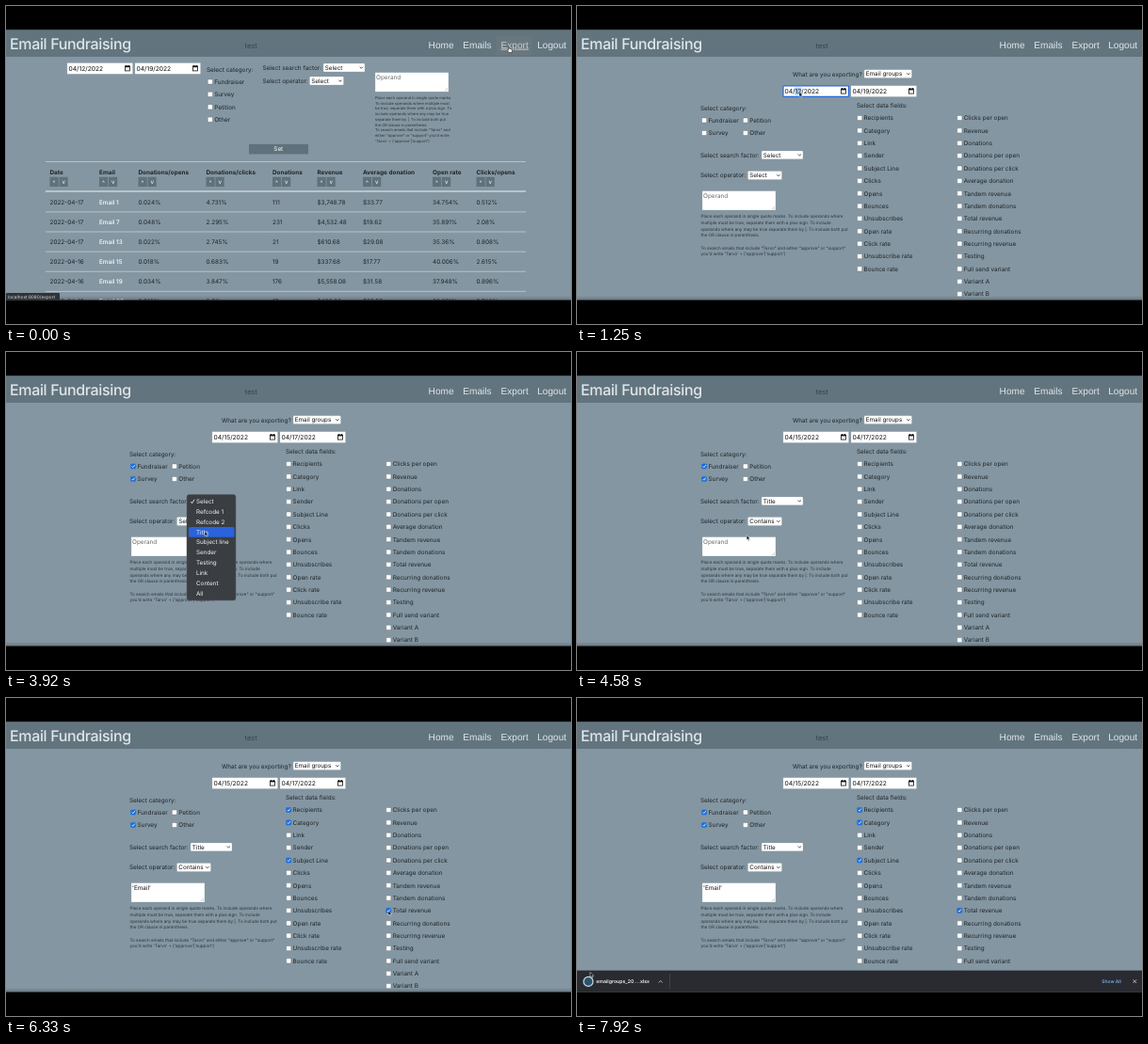
An HTML page for the animation above (8 s loop, 600 by 338 pixels).

```html
<!DOCTYPE html>
<html lang="en">
<head>
<meta charset="utf-8">
<title>Email Fundraising export</title>
<style>
html, body { margin: 0; width: 100%; height: 100%; overflow: hidden; background: #000; }
svg { display: block; width: 100vw; height: 100vh; }
text { font-family: Inter, "Open Sans", sans-serif; text-rendering: geometricPrecision; white-space: pre; }
.nav { font-family: "Liberation Sans", Arial, sans-serif; }
.brand { font-weight: 500; letter-spacing: -.35px; }
.medium { font-weight: 500; }
.semi { font-weight: 600; }
.bold { font-weight: 700; }
.under { text-decoration: underline; }
</style>
</head>
<body>
<svg id="stage" viewBox="0 0 600 338"></svg>
<script>
const INK = '#1d252a', PAGE = '#8496a1', BAR = '#62757f', PALE = '#e0e5e8';
const LOOP = 8000, FPS = 12;

// ---- drawing helpers; y is the middle of a line of text ----
const rect = (x, y, w, h, fill, extra = '') =>
  `<rect x="${x}" y="${y}" width="${w}" height="${h}" fill="${fill}" ${extra}/>`;
const text = (x, y, s, size = 6.4, fill = INK, extra = '') =>
  `<text x="${x}" y="${y + size * .36}" font-size="${size}" fill="${fill}" ${extra}>${s}</text>`;
const line = (d, color, w = .8) =>
  `<path d="${d}" fill="none" stroke="${color}" stroke-width="${w}"/>`;
const lines = (x, y, step, list, size) =>
  list.map((s, i) => text(x, y + i * step, s, size, '#29333a')).join('');

function check(x, y, label, on) {
  const box = rect(x + .3, y - 2.6, 5.2, 5.2, on ? '#1a6fe0' : '#fff',
    `rx="1" stroke="${on ? '#1a6fe0' : '#6d767b'}" stroke-width=".5"`);
  const tick = on ? line(`M${x + 1.5} ${y}l1.1 1.2 2-2.6`, '#fff') : '';
  return box + tick + text(x + 7.3, y, label);
}

function select(x, y, w, value) {
  return rect(x, y - 4.4, w, 8.8, '#fff', 'rx="1" stroke="#9aa6ad" stroke-width=".3"') +
    text(x + 1.8, y, value, 6.3, '#111') +
    line(`M${x + w - 5.2} ${y - .8}l1.6 1.6 1.6-1.6`, '#222', .8);
}

// part: 0 none, 1 day, 2 year
function dateBox(x, y, day, part = 0) {
  const mark = part === 1 ? rect(x + 12.2, y - 4, 7.3, 8, '#a9cdfa')
    : part === 2 ? rect(x + 21.8, y - 4, 16.4, 8, '#a9cdfa') : '';
  const ring = part ? 'rx="1" stroke="#2468dc" stroke-width="1.2"' : 'stroke="#b4bec4" stroke-width=".3"';
  const cx = x + 61.5;
  return rect(x, y - 5.8, 69.5, 11.6, '#fff', ring) + mark +
    text(x + 1.5, y, `04/${day}/2022`, 6.7, '#111') +
    rect(cx, y - 2.5, 5, 5, 'none', 'stroke="#111" stroke-width=".8"') +
    rect(cx, y - 2.8, 5, 1.6, '#111') + rect(cx + .6, y - 3.6, .8, 1, '#111') + rect(cx + 3.6, y - 3.6, .8, 1, '#111');
}

function operand(x, y, value, focus, caret) {
  const ring = focus ? 'rx="1" stroke="#2468dc" stroke-width="1.4"' : 'stroke="#8b979e" stroke-width=".3"';
  return rect(x, y, 78, 20.4, '#fff', ring) +
    text(x + 1, y + 5.2, value || (focus ? '' : 'Operand'), 6.4, value ? '#111' : '#6a6a6a') +
    (caret ? rect(x + caret, y + 1.6, .5, 7, '#111') : '') +
    line(`M${x + 74} ${y + 19.4}l3-3M${x + 76} ${y + 19.4}l1-1`, '#888', .4);
}

// ---- page pieces ----
const NAV = [['Home', 448.6], ['Emails', 485.3], ['Export', 525.6], ['Logout', 564.2]];

function header(hover) {
  const link = ([s, x]) => {
    const hot = hover && s === 'Export';
    return text(x, 41, s, 10.1, hot ? '#c6ccd0' : PALE, `class="nav${hot ? ' under' : ''}"`);
  };
  return rect(0, 25, 600, 29, BAR) + text(4, 40.4, 'Email Fundraising', 16, PALE, 'class="brand"') +
    text(253.5, 42, 'test', 7.6, '#35434b') +
    (hover ? rect(521, 32, 37, 20, '#6a777e') : '') + NAV.map(link).join('');
}

const status = rect(0, 305, 57, 8, '#2f3236', 'rx="1"') +
  text(2, 309.4, 'localhost:8080/export', 4.8, '#dcdfe1');

const shade = rect(0, 308, 600, 5, 'url(#dim)');

const COLS = [['Date', 46.5], ['Email', 99], ['Donations/opens', 140.5], ['Donations/clicks', 212.5],
  ['Donations', 283], ['Revenue', 330.5], ['Average donation', 379], ['Open rate', 453], ['Clicks/opens', 499.5]];
const ROWS = `2022-04-17,Email 1,0.024%,4.731%,111,$3|748.78,$33.77,34.754%,0.512%
2022-04-17,Email 7,0.048%,2.295%,231,$4|532.48,$19.62,35.891%,2.08%
2022-04-17,Email 13,0.022%,2.745%,21,$610.68,$29.08,35.36%,0.808%
2022-04-16,Email 15,0.018%,0.683%,19,$337.68,$17.77,40.006%,2.615%
2022-04-16,Email 19,0.034%,3.847%,176,$5|558.08,$31.58,37.948%,0.896%
2022-04-16,Email 22,0.016%,2.5%,17,$436.36,$25.55,38.361%,0.743%`
  .split('\n').map(r => r.split(',').map(c => c.replace('|', ',')));

function emailsPage() {
  let s = rect(0, 25, 600, 288, PAGE) + header(true) +
    dateBox(65, 66.4, 12) + dateBox(137, 66.4, 19) + text(213, 67.5, 'Select category:');
  ['Fundraiser', 'Survey', 'Petition', 'Other'].forEach((c, i) => s += check(213.9, 80.5 + i * 13.4, c));
  s += text(272.5, 65.5, 'Select search factor:') + select(337, 65.5, 44, 'Select') +
    text(272.5, 79.5, 'Select operator:') + select(322.5, 79.5, 36, 'Select') + operand(392, 70.7, '') +
    lines(392, 97.5, 5.75, ['Place each operand in single quote marks.', 'To include operands where multiple must',
      'be true, separate them with a plus sign. To', 'include operands where any may be true',
      'separate them by |. To include both put', 'the OR clause in parenthesis.',
      'To search emails that include "Tarvo" and', 'either "approve" or "support" you\'d write',
      "'Tarvo' + ('approve'|'support')"], 4.05) +
    rect(258, 146.8, 63, 10.6, '#5f727c') + text(284.3, 152, 'Set', 6.4, '#fff') +
    rect(42, 165.2, 510, .8, '#c3ccd2') + rect(42, 196.4, 510, 1.2, '#dde3e7');
  for (const [name, x] of COLS)
    s += text(x, 176.3, name, 6.4, INK, 'class="bold"') +
      ['^', 'v'].map((c, i) => rect(x + i * 10, 181.8, 9.2, 10.2, '#5f727c') +
        text(x + i * 10 + 2.9, c === '^' ? 188 : 186.7, c, 6.2, '#fff')).join('');
  ROWS.forEach((row, r) => {
    const y = 208.4 + r * 21.1;
    row.forEach((c, i) => s += text(COLS[i][1], y, c, 6.4, ...(i === 1 ? ['#fff', 'class="medium"'] : [])));
    s += rect(42, y + 10.1, 510, .8, '#c3ccd2');
  });
  return s + shade + status;
}

function loadingPage() {
  let s = rect(0, 25, 600, 288, '#fdfdfe') + rect(0, 25, 600, 28.5, '#949da5') +
    text(10.8, 43.2, 'Email Fundraising', 16, '#fff', 'class="brand"') + text(252, 45, 'test', 7.6, '#6d767d');
  [[434, 37, 'Home', 5], [471.6, 40.4, 'Emails', 5], [512.6, 38.6, 'Export', 4.8], [551.8, 41.4, 'Logout', 5.2]]
    .forEach(([x, w, label, pad]) => s += rect(x, 34, w, 20, '#a6a7a8', 'rx="1.5"') +
      text(x + pad, 44, label, 10.1, '#fff', 'class="nav"'));
  return s + shade + status;
}

const LEFT = ['Recipients', 'Category', 'Link', 'Sender', 'Subject Line', 'Clicks', 'Opens', 'Bounces', 'Unsubscribes',
  'Open rate', 'Click rate', 'Unsubscribe rate', 'Bounce rate'];
const RIGHT = ['Clicks per open', 'Revenue', 'Donations', 'Donations per open', 'Donations per click',
  'Average donation', 'Tandem revenue', 'Tandem donations', 'Total revenue', 'Recurring donations',
  'Recurring revenue', 'Testing', 'Full send variant', 'Variant A', 'Variant B'];
const CHECKED_AT = { Fundraiser: 2740, Survey: 3080, Recipients: 5740, Category: 5910, 'Subject Line': 6080, 'Total revenue': 6240 };
const FACTORS = ['Select', 'Refcode 1', 'Refcode 2', 'Title', 'Subject line', 'Sender', 'Testing', 'Link', 'Content', 'All'];

function menu(cursorY) {
  const step = 10.83, hot = Math.max(0, Math.min(9, Math.round((cursorY - 158.8) / step)));
  return rect(192, 151.5, 52, 112.5, '#3a3e42', 'rx="2.5" stroke="#565b60" stroke-width=".5"') +
    rect(194, 153.6 + hot * step, 48.5, 10.6, '#2a63dc', 'rx="1.5"') +
    FACTORS.map((s, i) => text(202, 158.9 + i * step, s, 6.3, '#f2f3f4')).join('') +
    line('M196.2 159l1.4 1.8 2.4-4', '#fff', .8);
}

function exportPage(t, cursorY) {
  const typed = (start) => t < start ? null : t < start + 80 ? '01' : 'done';
  const day1 = { '01': '01', done: '15' }[typed(1410)] || '12';
  const day2 = { '01': '01', done: '17' }[typed(2330)] || '19';
  const part1 = t < 1160 || t >= 2160 ? 0 : day1 === '15' ? 2 : 1;
  const part2 = t < 2160 || t >= 2740 ? 0 : day2 === '17' ? 2 : 1;
  const box = (x, y, label) => check(x, y, label, t >= CHECKED_AT[label]);

  const count = t >= 5240 ? 7 : Math.max(0, Math.min(6, Math.floor((t - 4575) / 83.3)));
  const focus = t >= 4575 && t < 5740;
  const caret = [1.2, 2.4, 6.2, 11.8, 15.4, 17, 18.6, 20.4][count];

  let s = rect(0, 25, 600, 288, PAGE) + header(false) + shade +
    text(229, 72.3, 'What are you exporting?') + select(305, 72.1, 50.5, 'Email groups') +
    dateBox(219, 90.6, day1, part1) + dateBox(291, 90.6, day2, part2) +
    text(131, 108.4, 'Select category:') +
    box(132.2, 121.5, 'Fundraiser') + box(176, 121.5, 'Petition') +
    box(132.2, 135, 'Survey') + box(176, 135, 'Other') +
    text(131, 158.3, 'Select search factor:') + select(196, 158.3, 44, t >= 4080 ? 'Title' : 'Select') +
    text(131, 180, 'Select operator:') + select(181.5, 180, 36, t >= 4410 ? 'Contains' : 'Select') +
    operand(133, 196.6, "'Email'".slice(0, count), focus, focus && caret) +
    lines(131.5, 223.5, 6.7, ['Place each operand in single quote marks. To include operands where',
      'multiple must be true, separate them with a plus sign. To include',
      'operands where any may be true separate them by |. To include both put',
      'the OR clause in parenthesis.', '',
      'To search emails that include "Tarvo" and either "approve" or "support"',
      "you'd write 'Tarvo' + ('approve'|'support')"], 4.56) +
    text(297, 106, 'Select data fields:');
  LEFT.forEach((f, i) => s += box(297.3, 119 + i * 13.37, f));
  RIGHT.forEach((f, i) => s += box(403.4, 119 + i * 13.37, f));
  if (t >= 3580 && t < 4080) s += menu(cursorY);
  if (t >= 7320) s += downloads(Math.min(1, (t - 7240) / 250));
  return s;
}

function downloads(p) {
  return `<g transform="translate(0 ${(1 - p) * 23})">` + rect(0, 289.6, 600, 23.4, '#292b30') +
    rect(98, 293, .6, 16, '#50545a') +
    '<circle cx="12" cy="301.4" r="5" fill="#2c536b" stroke="#c9dfea" stroke-width="1.2"/>' +
    text(20.3, 301.6, 'emailgroups_20....xlsx', 5.2, '#f0f1f2', 'class="semi"') +
    line('M86.8 302.5l1.9-2 1.9 2', '#d0d3d6', .8) + text(557.3, 301.2, 'Show All', 4.9, '#78abf3', 'class="semi"') +
    line('M590.5 299.4l3.6 3.6m0-3.6l-3.6 3.6', '#d0d3d6', .8) + '</g>';
}

// ---- pointer: time, x, y ----
const PATH = [[0, 533.5, 42.6], [420, 533.5, 42.6], [750, 336, 101.5], [1160, 236, 91.5], [2000, 236, 91.5], [2160, 306, 92],
  [2480, 306, 92], [2730, 135, 121], [2910, 135, 121], [3080, 135, 134], [3250, 135, 134], [3570, 212, 158],
  [3660, 212, 160], [3910, 211, 190.5], [4080, 211, 190.5], [4330, 195, 180], [4410, 195, 180], [4570, 170, 205],
  [5500, 170, 205], [5730, 300, 119], [5900, 300, 132], [6070, 300, 172], [6240, 406, 226], [6490, 406, 226],
  [7000, 94.5, 161.5], [7250, 60, 215], [7660, 14, 291.5], [LOOP, 14, 291.5]];

function pointerAt(t) {
  const i = PATH.findIndex(p => p[0] > t), [t0, x0, y0] = PATH[i - 1], [t1, x1, y1] = PATH[i];
  const u = (t - t0) / (t1 - t0), e = u * u * (3 - 2 * u);
  return [x0 + (x1 - x0) * e, y0 + (y1 - y0) * e];
}

function pointer(t, [x, y]) {
  if (t >= 4660 && t <= 5500) return '';
  const shape = t < 500
    ? 'M0 .5q.8-.6 1.1.3v2l2.4.6q.7.3.5 1.2L3.5 7H.6L-1.2 4.4q.2-.9 1.2 0Z'
    : 'M0 0v5l1.2-1 .9 1.9.9-.4-.9-1.8h1.6Z';
  const [fill, edge] = t < 500 ? ['#fff', '#111'] : ['#000', '#fff'];
  return `<path transform="translate(${x} ${y})" d="${shape}" fill="${fill}" stroke="${edge}" stroke-width=".5"/>`;
}

const DEFS = '<defs><linearGradient id="dim" x2="0" y2="1"><stop stop-opacity="0"/>' +
  '<stop offset="1" stop-opacity=".22"/></linearGradient>' +
  '<clipPath id="screen"><rect y="25.4" width="600" height="287.1"/></clipPath></defs>';
const stage = document.getElementById('stage');
let shown = -1;

function draw(now) {
  const frame = Math.floor(now % LOOP * FPS / 1000 + 1e-6);
  if (frame !== shown) {
    shown = frame;
    const t = frame * 1000 / FPS, at = pointerAt(t);
    const page = t < 650 ? emailsPage() : t < 900 ? loadingPage() : exportPage(t, at[1]);
    stage.innerHTML = DEFS + rect(0, 0, 600, 338, '#000') +
      `<g clip-path="url(#screen)">${page}${pointer(t, at)}</g>`;
  }
  requestAnimationFrame(draw);
}
draw(performance.now());
</script>
</body>
</html>
```
